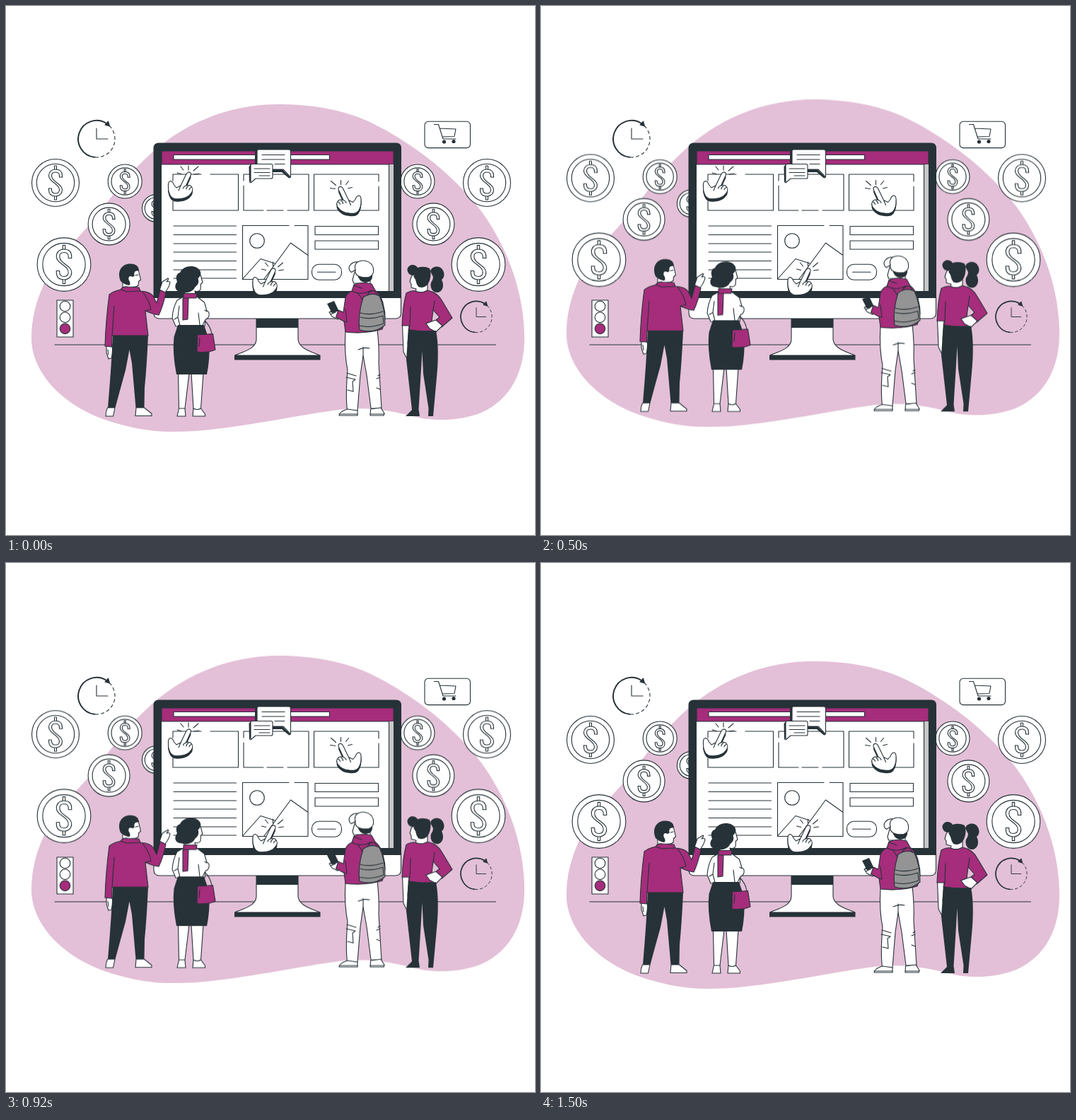
An HTML page without scripts that plays this animation: 748 px wide and 748 px high, repeating every 1540 ms.

```html
<!DOCTYPE html>
<html lang="en">
<head>
<meta charset="utf-8">
<title>Online audience</title>
<style>
html, body { margin: 0; width: 100%; height: 100%; overflow: hidden; background: #fff; }
svg { display: block; width: 100%; height: 100%; }
.o, .p, .g, .l { stroke: #263238; stroke-width: 1.1; stroke-linejoin: round; stroke-linecap: round; }
.o { fill: #fff; }
.p { fill: #a52d7b; }
.g { fill: #949494; }
.l { fill: none; }
.d { fill: #263238; }
.even { vector-effect: non-scaling-stroke; }
.float { animation: float 1540ms -5ms infinite; }
/* 1500 ms up and down, then a short rest */
@keyframes float {
  0% { transform: translateY(0); animation-timing-function: steps(18); }
  48.701% { transform: translateY(-10px); animation-timing-function: steps(18); }
  97.403%, 100% { transform: translateY(0); }
}
</style>
</head>
<body>
<svg viewBox="0 0 748 748">
<defs>
  <path id="half-dollar" class="l even" d="M9.500-8V-10C9.500-16 6-19 0-19S-9.500-15-9.500-10C-9.500-1 5.500 1 5.500 10C5.500 13.500 3.500 15 0 15S-5.500 13.500-5.500 10V8H-9.500M-1.500-19V-24H1.500V-19"/>
  <g id="coin">
    <circle class="o even" r="33.5"/>
    <circle class="o even" r="26.7"/>
    <use href="#half-dollar"/>
    <use href="#half-dollar" transform="rotate(180)"/>
  </g>
  <g id="clock" class="l">
    <path d="M-3 25.800A26 26 0 1 1 14-22" stroke-width="2"/>
    <path d="M18-18.800A26 26 0 0 1-3 25.800" stroke-dasharray="5 3.400" stroke-linecap="butt"/>
    <path class="d" d="M12-20L18.500-18L16.500-25Z"/>
    <path d="M0-15V0H16"/>
  </g>
  <path id="fist" d="M254.500 238.500Q257 233.500 260.500 235.500Q262.500 237 260.500 241L254.500 254Q259 252 262 255Q266 260 261.500 265Q257 271.500 246 272.500Q237 274 233 269Q229 263 229.500 255Q229 248 232.500 247.500Q236 248 237.500 253L241 257L247 254Z"/>
  <g id="pointer">
    <use href="#fist" class="d" y="4"/>
    <use href="#fist" class="d" x="-.5" y="2"/>
    <use href="#fist" class="o"/>
    <path class="l" d="M247 254L244 261M254.500 254Q251 255 250.500 258M258 254.500Q255 256 255 259M262 256.500Q259 258 259 260M258 226V232M247 227L251 232M242 236L248 237.500M265 233L272 227M266 238L273 237"/>
  </g>
</defs>

<g class="float">
  <path fill="#e3c0d7" d="M385 139C320 139 258 162 209 205C175 235 156 260 138 285C110 322 75 350 55 390C42 418 36 443 36 470C36 515 75 562 140 585C172 596 204 602 235 602C310 602 400 580 470 571C510 566 545 572 575 580C600 587 640 588 672 575C715 556 733 515 733 470C733 410 712 345 672 290C630 235 570 190 510 162C468 144 425 139 385 139Z"/>
  <use href="#coin" transform="translate(70 250)"/>
  <use href="#coin" transform="translate(168.200 248) scale(.717)"/>
  <use href="#coin" transform="translate(145.600 308.400) scale(.88)"/>
  <use href="#coin" transform="translate(82 365.500) scale(1.13)"/>
  <use href="#coin" transform="translate(211.500 286) scale(.57)"/>
  <use href="#coin" transform="translate(680 250)"/>
  <use href="#coin" transform="translate(582 248) scale(.717)"/>
  <use href="#coin" transform="translate(604.400 308.400) scale(.88)"/>
  <use href="#coin" transform="translate(668 365.500) scale(1.13)"/>
</g>

<path class="l" d="M69 479H692.500"/>
<use href="#clock" x="128" y="188"/>
<use href="#clock" transform="translate(665 439.500) scale(.85)"/>

<g id="cart">
  <rect class="o" x="592" y="163.300" width="64.500" height="37.300" rx="5"/>
  <path class="l" d="M605.500 167.500H611.500L618 188H636M613.500 173L636 174L634 184.500L617 185"/>
  <circle class="d" cx="619.500" cy="192" r="2.600"/>
  <circle class="d" cx="633" cy="191.500" r="2.600"/>
</g>

<g id="traffic-light">
  <rect class="o" x="72" y="416" width="23" height="52"/>
  <circle class="o" cx="83.500" cy="424.500" r="7.300"/>
  <circle class="o" cx="83.500" cy="440.300" r="7.300"/>
  <circle class="p" cx="83.500" cy="456.300" r="7.300"/>
</g>

<g id="monitor">
  <path class="o" d="M354 442V472C353 485 335 489 323.500 494H444C432 489 415 485 413 472V442Z"/>
  <path class="d" d="M354 442H413V455H354ZM323 494H444.500V500.500H323Z"/>
  <path class="o" d="M209 410H558.500V434Q558.500 442 550.500 442H217Q209 442 209 434Z"/>
  <path class="d" d="M208.500 413V201Q208.500 193.500 216 193.500H551.500Q559 193.500 559 201V413Z"/>
  <path fill="#fff" d="M220 205H548V403H220Z"/>
  <path class="p" d="M220 205H548V224H220Z"/>
  <path class="o" d="M237 210.500H457.500V217H237Z"/>
  <path fill="#c7c7c7" d="M541.500 224H548V403H541.500Z"/>
  <path class="l" d="M541.500 224V403"/>
</g>

<g id="page">
  <path class="l" d="M236 247V238H276M289 238H328.500V289H236V276M336 247V238H428V289H398M392 289H369M364 289H336V254M527 248V238H435.500V289H527V255"/>
  <path class="l" d="M237 311H325.500M237 323.500H325.500M237 336H325.500M237 348H325.500M237 360.500H325.500M237 373H325.500M237 385H325.500"/>
  <path class="l" d="M400 310.500H334.500V386.500H427V310.500H408M334.500 386L360 357.500L380 364M365 386L402.500 335L427 352.500"/>
  <circle class="l" cx="355" cy="332" r="10.300"/>
  <path class="o" d="M437 311.500H526.500V323.500H437ZM437 332H526.500V344H437Z"/>
  <rect class="o" x="432.500" y="365.300" width="42" height="22" rx="10"/>
  <path class="l" d="M440.500 376.300H466"/>
  <path class="d" d="M352 206L355.500 203V230H377L391 231L402.500 243L400 243.500L390 235H352Z"/>
  <path class="o" d="M357 203H400Q402.500 203 402.500 206V242L392 231H355V205Q355 203 357 203Z"/>
  <path class="d" d="M343.500 227L347 223.500L348 244L344 250.500Z"/>
  <path class="o" d="M348 223.500H375Q377 223.500 377 226V242Q377 244 375 244H353L346 250V226Q346 223.500 348 223.500Z"/>
  <path class="l" d="M362 210.500H394M362 217H394M380 223.500H394M351 230H373M351 235.500H373M358 240H373"/>
  <use href="#pointer"/>
  <use href="#pointer" x="119.500" y="136"/>
  <use href="#pointer" transform="matrix(-1 0 0 1 731.500 20.500)"/>
</g>

<g class="float">
  <g id="pointing-man">
    <path class="o" d="M165 402V386L176 372H187L190.500 387L187.500 389.500L187 395Q184 398 179 397L181 404Z"/>
    <path class="d" d="M162 389C156 374 165 364 176 364.500C184 364.500 189 369 187 374.500C182 374 181 376 181.500 382L178.500 383C175 380 172 384 174 388C176 391 176 394 174 395Q167 394 162 389Z"/>
    <path class="l" d="M183 381L187 380"/>
    <path class="o" d="M217 402L221 390L229 385Q231 385 227 390Q231 388 232 391Q231 397 225 405Z"/>
    <path class="o" d="M142 480H149.500L151.500 487L149 498L145 499L142 490Z"/>
    <path class="p" d="M146 408Q152 403 162 401Q165 396 172 397L188 398L190 403Q204 404 208 410L213 420L218 401.500L226 405.500Q222 425 216 437Q208 436 197 431L201 466H150L149.500 482L140 481Q141 445 146 408Z"/>
    <path class="l" d="M150 466L153 424M162 401L171 404L190 403M193 404Q203 417 205 429M205 429L197 431M144 486L145 493"/>
    <path class="d" d="M151 466H201Q199 510 196 540L195.500 568H183.500L178 505L174.500 486L169 515Q162 540 154.500 568H144Q149 510 151 466Z"/>
    <path class="o" d="M143.500 568H154L151.500 580H141Q141 573 143.500 568ZM184 568H195.500L206 576.500V579.500H183Z"/>
  </g>

  <g id="bag-woman">
    <path class="o" d="M253 408V393L268 378L275 380L278 391L275.500 393L275 401Q272 405 267 403L268 408Z"/>
    <path class="d" d="M242 390C239 382 242 378 246 377C250 368 262 366 270 370C278 375 276 382 271.500 385C274 392 270 395 267 398C264 405 253 407 248 404C239 404 237 396 242 390Z"/>
    <path class="o" d="M242 416L251 411H270L280.500 419L284 431Q288 432 287 438Q285 443 282 443L281 453H240L235 441Q236 427 242 416Z"/>
    <path class="l" d="M245 424L243 440L246 452M272 434L274 451M281 430L284 432M238 443L243 440"/>
    <path class="p" d="M251 406.500H270L269 413H251ZM250 413H258L257 443L250 444Z"/>
    <path class="o" d="M243.500 519H259L253 569L254 580H242L244.500 569ZM262 519H279L275.500 569L281.500 577V580H264L265 569Z"/>
    <path class="l" d="M244.500 569H253M265 569Q270 572 275.500 569"/>
    <path class="d" d="M243 451H280L287.500 473Q288.500 500 284 521H241Q235 490 237.500 468Z"/>
    <path class="l" d="M275 465Q276 454 281 445Q289 452 291 464"/>
    <path class="p" d="M270.500 465L292.500 463.500L296 486Q285 491 270 489Z"/>
    <path class="l" d="M274 469L273 481"/>
  </g>

  <g id="backpack-man">
    <path class="o" d="M494 373L490 387L491.500 392H498L499 398H515V380Z"/>
    <path class="d" d="M497 380H518Q519 390 508 391Q499 390 497 380Z"/>
    <path class="o" d="M497 362C507 357 521 362 519.500 376Q519 381 513 383.500Q503 385 497 381Q493 378 494 373L488.500 376.500Q484 374 485.500 368Q490 361 497 362Z"/>
    <path class="l" d="M497 362Q492 366 494 373"/>
    <path class="o" d="M480 460Q505 465 525 456Q528 485 527 505L531 569H516L510 522L505 494L501 522L497 572H482.500Q480 550 483 515Q478 490 480 460Z"/>
    <path class="l" d="M498 486Q506 482 514 484M505 494V482M481 525L494 528L490 531L491 545L483 543M482 519L495 523M526 523L529 521M524 527L529 525M524 540L529 542"/>
    <path class="o" d="M482.500 570L497 572V579H471Q471 574 482.500 570ZM515.500 570L530 568L535 576L534 579H515Z"/>
    <path class="l" d="M471 577H497M515 577H535"/>
    <path class="o" d="M457 433L467 427L473 437L469 443L461 439Z"/>
    <path class="d" d="M454 421L464 417L470.500 431L461 434.500Z"/>
    <path class="l" d="M459 433L465 430M459 436L466 433"/>
    <path class="p" d="M489 403L492 394Q503 389 517 393L522 402Q532 410 534 425Q539 442 532 457Q508 464 480 461L478 446L466.500 440L470 430L477 433L480 412Q483 405 489 403Z"/>
    <path class="l" d="M489 403Q502 410 517 402M492 395L503 399M480 429L482 447L478 446M497 405L505 417"/>
    <path class="g" d="M505 412Q517 404 528 410Q536 427 536 451Q522 464 500 458Q497 438 505 412Z"/>
    <path class="l" d="M511 409Q514 402 521 403L525 409M501 434Q515 438 533 432M501 440Q515 444 533 438L534 449Q515 456 500 452"/>
  </g>

  <g id="ponytail-woman">
    <path class="o" d="M576 379L573 383L571 390L573 393V398L580 400L579 405H596V390Z"/>
    <path class="d" d="M580 379C575 384 567 379 567.500 372C570 364 579 365 582 370Q591 367 599 371L600.500 376Q601 387 596 394Q590 400 583 397Q580 393 579 387L576 382Z"/>
    <path class="d" d="M600 375C602 367 614 366 618 374C621 380 619 385 616 387C620 395 618 403 611 405C603 406 599 398 601 391Q604 387 604 383Z"/>
    <path class="o" d="M560.500 451H570L568 477L571 495L567 499L562 489Z"/>
    <path class="p" d="M566 406Q574 402 579 403Q587 407 596 402Q610 405 616 416L631 441L616 454L607 445L613 440L604 430L602 446L594 449L608 459Q587 461 569 458L571 452L560 452Q561 424 566 406Z"/>
    <path class="o" d="M594 449L602 446L608 444L617 452L608 461L599 456Z"/>
    <path class="l" d="M571 452L572 425M604 430L606 417"/>
    <path class="d" d="M569 457Q588 461 608 459Q613 484 609 525L605 569L604 580H597L597.500 569L590 520L588.500 488L586 530L583.500 570L585 580H565L574 571L566 500Z"/>
  </g>
</g>
</svg>
</body>
</html>
```
